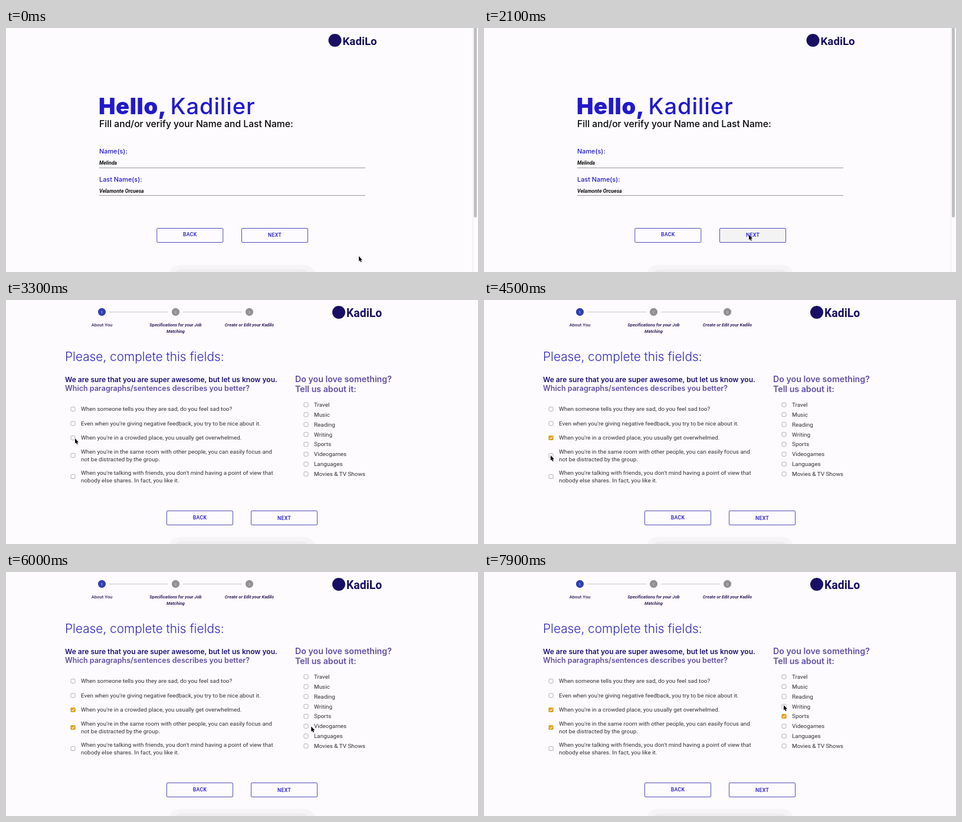
These frames come from a looping animation (800x416 px, 8000 ms). An HTML page:

```html
<!DOCTYPE html>
<html lang="en">
<head>
<meta charset="utf-8">
<title>Sign-up form</title>
<style>
  html, body { margin: 0; width: 100%; height: 100%; overflow: hidden; background: #fdfbfe; }
  svg { display: block; width: 800px; height: 416px; }
  text { font-family: Inter, sans-serif; font-optical-sizing: none; white-space: pre; }
  .ui { font-family: Roboto, sans-serif; }
  .mid { text-anchor: middle; }
  .bi { font-weight: 700; font-style: italic; }
</style>
</head>
<body>
<svg id="stage" viewBox="0 0 800 416"></svg>
<script>
const DURATION = 8000, STEP = 100;
const BLUE = '#2119cd', NAVY = '#180f63', VIOLET = '#5f4fa3', INK = '#303030', RULE = '#969598';
const BRAND = 'KadiLo';

const text = (x, y, size, fill, content, weight = 400, cls = '', spacing = 0) =>
  `<text x="${x}" y="${y}" font-size="${size}" fill="${fill}" font-weight="${weight}" class="${cls}" letter-spacing="${spacing}">${content}</text>`;
const line = (x1, x2, y, color) =>
  `<path d="M${x1} ${y}H${x2}" stroke="${color}"/>`;
const button = (x, y, label, labelY, id = '') =>
  `<rect id="${id}" x="${x}" y="${y}" width="112" height="24" rx="1.5" fill="#fdfbfe" stroke="#514cb6"/>` +
  text(x + 56, labelY, 8.75, BLUE, label, 500, 'ui mid', 0.25);
const logo = (x, size) =>
  `<circle cx="${x}" cy="21" r="11" fill="${NAVY}"/>` +
  text(x + 13, 28.5, size, NAVY, BRAND, 700, 'ui');
const checkbox = (x, y, id) =>
  `<rect x="${x - 3.5}" y="${y - 3.5}" width="7" height="7" rx="1.5" fill="#fff" stroke="#a5a3a8" stroke-width=".9"/>
   <g id="${id}" display="none"><rect x="${x - 4}" y="${y - 4}" width="8" height="8" rx="1.5" fill="#e3a01a"/>
   <path d="M${x - 2} ${y}l1.5 1.7 2.6-3.4" fill="none" stroke="#fff" stroke-width="1.1"/></g>`;
const step = (x, number, color) =>
  `<circle cx="${x}" cy="20.3" r="6.6" fill="${color}"/>` +
  text(x, 22.6, 6.2, number === 1 ? '#fff' : '#d8d8d8', number, 400, 'ui mid');

const sentences = [
  [186, 'When someone tells you they are sad, do you feel sad too?'],
  [210.5, 'Even when you\'re giving negative feedback, you try to be nice about it.'],
  [235, 'When you\'re in a crowded place, you usually get overwhelmed.'],
  [265, 'When you\'re in the same room with other people, you can easily focus and', 'not be distracted by the group.'],
  [301, 'When you\'re talking with friends, you don\'t mind having a point of view that', 'nobody else shares. In fact, you like it.']
];
const hobbies = ['Travel', 'Music', 'Reading', 'Writing', 'Sports', 'Videogames', 'Languages', 'Movies &amp; TV Shows'];

const sentenceList = sentences.map(([y, ...rows], i) =>
  checkbox(113.5, y, 'sentence' + i) +
  rows.map((row, r) => text(127, y + 3.4 + (r - (rows.length - 1) / 2) * 12.2, 9.92, INK, row, 400, 'ui')).join('')
).join('');
const hobbyList = hobbies.map((name, i) => {
  const y = 178.5 + i * 16.87;
  return checkbox(508.5, y, 'hobby' + i) + text(522, y + 3.4, 9.92, INK, name, 400, 'ui');
}).join('');

const namePage =
  logo(557.5, 18.7) +
  text(157, 147, 38, BLUE, 'Hello,', 900, '', 0.6) +
  text(278.5, 147, 38, BLUE, 'Kadilier', 450, '', 0.9) +
  text(158, 169, 15.7, '#050508', 'Fill and/or verify your Name and Last Name:', 550) +
  text(158, 214, 10.9, BLUE, 'Name(s):', 550) +
  text(158, 232.5, 8.6, '#111', 'Melinda', 700, 'ui bi') +
  line(158, 609, 238.5, RULE) +
  text(158, 262, 10.9, BLUE, 'Last Name(s):', 550) +
  text(158, 280.5, 8.85, '#111', 'Velamonte Orcuesa', 700, 'ui bi') +
  line(158, 609, 285.5, RULE) +
  button(255.8, 341.5, 'BACK', 355) +
  button(399.5, 341.5, 'NEXT', 356, 'next') +
  `<path d="M791.5 0V416" stroke="#ebe9ec"/>
   <rect x="793" y="-5" width="5" height="328" rx="2.5" fill="#bebdc0"/>`;

const fieldsPage =
  logo(564, 19.4) +
  line(175, 275, 20.5, '#c4c2c6') + line(300, 400, 20.5, '#c4c2c6') +
  step(162.5, 1, '#303fb0') + step(287.5, 2, '#919093') + step(412.5, 3, '#919093') +
  text(162.5, 45, 7.7, '#33215c', 'About You', 500, 'ui mid') +
  text(287.5, 45, 7.5, '#33215c', 'Specifications for your Job', 700, 'ui mid bi') +
  text(287.5, 56, 7.5, '#33215c', 'Matching', 700, 'ui mid bi') +
  text(412.5, 45, 7.5, '#33215c', 'Create or Edit your Kadilo', 700, 'ui mid bi') +
  text(100, 103.5, 20.8, '#3028bd', 'Please, complete this fields:', 300) +
  text(100, 139.5, 12.05, '#1c1073', 'We are sure that you are super awesome, but let us know you.', 600) +
  text(100, 155, 12.5, VIOLET, 'Which paragraphs/sentences describes you better?', 600) +
  text(490, 139.5, 14.2, VIOLET, 'Do you love something?', 600) +
  text(490, 157, 14.2, VIOLET, 'Tell us about it:', 600) +
  sentenceList + hobbyList +
  button(272.5, 359.5, 'BACK', 374) +
  button(415.5, 359.5, 'NEXT', 375);

document.getElementById('stage').innerHTML = `
  <rect width="800" height="416" fill="#fdfbfe"/>
  <g id="namePage">${namePage}</g>
  <g id="fieldsPage">${fieldsPage}</g>
  <rect x="275" y="404" width="250" height="40" rx="20" fill="#f6f4f7"/>
  <rect x="284" y="411.5" width="232" height="30" rx="14" fill="#efedf0"/>
  <path id="cursor" d="M0 0V8.8L1.9 7.1L3.2 10.2L4.7 9.5L3.4 6.5H6Z" fill="#000" stroke="#fff" stroke-width="1" paint-order="stroke"/>`;

// Pointer stops: time, x, y
const stops = [
  [0, 598, 389], [600, 449, 352.5], [2200, 449, 352.5], [3000, 125, 260], [3300, 117, 236],
  [3700, 113, 235], [4000, 113, 236], [4300, 113, 265], [5000, 113, 265], [5900, 517, 263],
  [6300, 519, 265], [6800, 507, 245], [7700, 506, 243], [7900, 508, 227]
];
const clicks = { sentence2: 3800, sentence3: 4800, hobby4: 7200 };
const PAGE_CHANGE = 2200;

const $ = id => document.getElementById(id);
const show = (id, on) => $(id).setAttribute('display', on ? 'inline' : 'none');
const clamp = v => Math.min(1, Math.max(0, v));

function pointerAt(t) {
  const next = stops.findIndex(s => s[0] > t);
  if (next < 0) return stops[stops.length - 1].slice(1);
  const [t0, x0, y0] = stops[next - 1], [t1, x1, y1] = stops[next];
  const u = (t - t0) / (t1 - t0), k = u * u * (3 - 2 * u);
  return [x0 + (x1 - x0) * k, y0 + (y1 - y0) * k];
}

function draw(now) {
  const t = Math.floor(now % DURATION / STEP) * STEP;
  show('namePage', t < PAGE_CHANGE);
  show('fieldsPage', t >= PAGE_CHANGE);
  for (const id in clicks) show(id, t >= clicks[id]);
  const hover = clamp((t - 400) / 300);
  $('next').setAttribute('fill', `rgb(${253 - 10 * hover},${251 - 8 * hover},${254 - 11 * hover})`);
  $('cursor').setAttribute('transform', `translate(${pointerAt(t)})`);
}

const start = performance.now();
function loop() {
  draw(performance.now() - start);
  requestAnimationFrame(loop);
}
loop();
</script>
</body>
</html>
```
